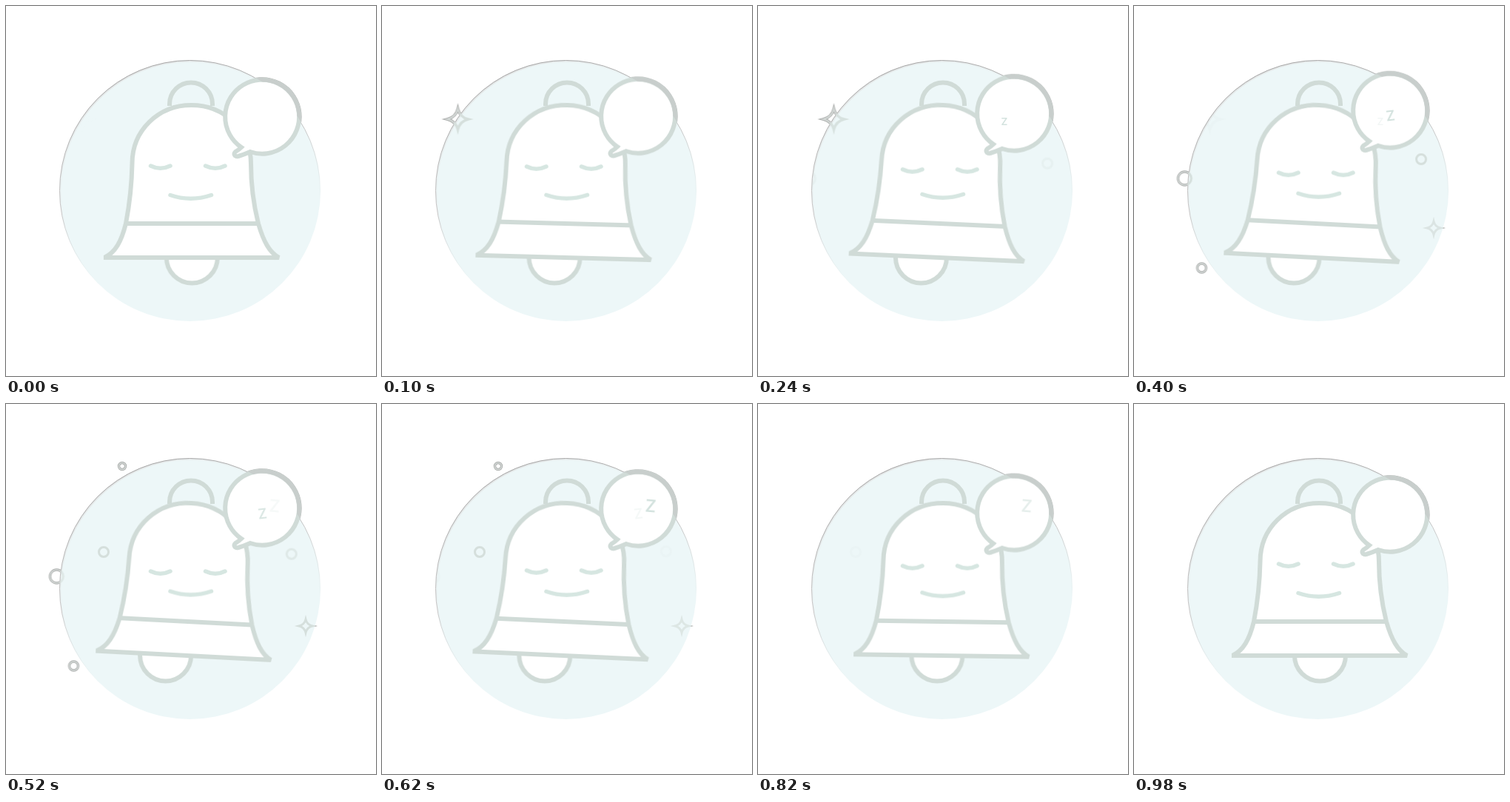
An HTML page that plays this animation: 500x500 px, repeating every 1 s.

```html
<!DOCTYPE html>
<html lang="en">
<head>
<meta charset="utf-8">
<title>Sleeping bell</title>
<style>
html, body { margin: 0; width: 100%; height: 100%; overflow: hidden; background: #fff; }
svg { display: block; width: 100vw; height: 100vh; }
.line { fill: none; stroke: #d0dbd7; stroke-width: 6; }
.solid { fill: #fff; }
.face { fill: none; stroke: #d6e6e1; stroke-width: 5.5; stroke-linecap: round; }
.spark { fill: none; stroke-miterlimit: 8; }
#bell { transform-origin: 250px 131px; }
text { font-family: Inter, "Open Sans", sans-serif; font-weight: 600; fill: #d3e2de; text-anchor: middle; }
</style>
</head>
<body>
<svg viewBox="0 0 500 500">
  <defs>
    <clipPath id="in"><circle cx="248.5" cy="249.5" r="176.5"/></clipPath>
    <clipPath id="out"><path clip-rule="evenodd" d="M0 0H500V500H0ZM72 249.5a176.5 176.5 0 1 0 353 0a176.5 176.5 0 1 0 -353 0Z"/></clipPath>
    <linearGradient id="rim" x1=".25" y1="0" x2=".6" y2="1">
      <stop offset="0" stop-color="#a3a1a1"/>
      <stop offset=".45" stop-color="#c8c5c5"/>
      <stop offset=".75" stop-color="#e4eeee" stop-opacity="0"/>
    </linearGradient>
    <linearGradient id="glow" x1=".2" y1="0" x2=".7" y2=".8">
      <stop offset="0" stop-color="#e0e1e1"/>
      <stop offset=".6" stop-color="#edf7f8" stop-opacity="0"/>
    </linearGradient>
    <path id="balloon" d="M330 197A50 50 0 1 0 318 191Q315 194 310 197C307 200 309 204 314 203Q321 201 330 197Z"/>
  </defs>
  <circle cx="248.5" cy="249.5" r="176.5" fill="#edf7f8"/>
  <circle cx="248.5" cy="249.5" r="175" fill="none" stroke="url(#glow)" stroke-width="2.5"/>
  <circle cx="248.5" cy="249.5" r="176" fill="none" stroke="url(#rim)"/>
  <g id="inner" clip-path="url(#in)"></g>
  <g id="outer" clip-path="url(#out)"></g>

  <path class="line" d="M221 135V132.500A29 29 0 0 1 279 132.500V135"/>
  <circle id="clapper" class="line solid" cx="251.500" cy="340" r="34.500"/>
  <g id="bell">
    <path class="line solid" d="M132 340H369C356 333 348 318 341 294C334 266 331 238 331 213C331 168 295 134 250.500 134C206 134 170.500 168 170.500 213C170 240 167 268 162 294C156 318 148 333 133 340"/>
    <path class="line" d="M162 294H341"/>
  </g>
  <path id="eyes" class="face" d="M195.500 216Q208.500 222.500 222 216M269.500 216Q283 222.500 296 216"/>
  <path id="mouth" class="face" d="M222 255.500Q249.500 265 277.500 255.500"/>

  <g clip-path="url(#out)"><use class="float" href="#balloon" fill="none" stroke="#b4b6b5" stroke-width="7"/></g>
  <use class="float line solid" href="#balloon" style="fill:#fff"/>
  <g clip-path="url(#out)"><use class="float" href="#balloon" fill="none" stroke="#c8cecc" stroke-width="5.500"/></g>
  <g id="zs"></g>
</svg>
<script>
const LOOP = 1000;
const NS = 'http://www.w3.org/2000/svg';
const $ = id => document.getElementById(id);

function add(parent, tag, attrs) {
  const el = document.createElementNS(NS, tag);
  for (const k in attrs) el.setAttribute(k, attrs[k]);
  return parent.appendChild(el);
}
function play(el, frames) {
  el.animate(frames, { duration: LOOP, iterations: Infinity }).startTime = 0;
}
// there and back again, turning at half time
function sway(el, from, to, easeOut = 'ease-in-out') {
  play(el, [
    { transform: from, easing: easeOut },
    { transform: to, offset: 0.5, easing: 'ease-in-out' },
    { transform: from }
  ]);
}
// steps are [ms, opacity]
function fade(el, steps) {
  const all = [[0, 0], ...steps, [LOOP, 0]];
  play(el, all.map(([t, opacity]) => ({ offset: t / LOOP, opacity })));
}

const swing = 'cubic-bezier(.215,.61,.355,1)';
sway($('bell'), 'rotate(0deg)', 'rotate(3deg)', swing);
sway($('clapper'), 'translateX(0px)', 'translateX(-36px)', swing);
sway($('eyes'), 'translateY(0px)', 'translateY(10px)');
sway($('mouth'), 'translateY(0px)', 'translateY(-2.5px)');
document.querySelectorAll('.float').forEach(el =>
  sway(el, 'translateY(0px)', 'translateY(-9px)'));

const star = s => {
  const a = 15 * s, b = 3 * s;
  return `M0 ${-a}Q${b} ${-b} ${a} 0Q${b} ${b} 0 ${a}Q${-b} ${b} ${-a} 0Q${-b} ${-b} 0 ${-a}Z`;
};
const ring = r => `M${-r} 0a${r} ${r} 0 1 0 ${2 * r} 0a${r} ${r} 0 1 0 ${-2 * r} 0Z`;

const sparks = [
  { x: 102.5, y: 153, d: star(0.93), w: 3.5, start: 0 },
  { x: 405, y: 300, d: star(0.6), w: 3, start: 340 },
  { x: 68.5, y: 233, d: ring(9), w: 3, start: 220 },
  { x: 91.5, y: 354, d: ring(6), w: 3, start: 220 },
  { x: 391.5, y: 213.5, d: ring(6.5), w: 3, start: 220, drift: [-8, -15] },
  { x: 157, y: 84, d: ring(4.5), w: 3, start: 420 },
  { x: 132, y: 200, d: ring(6.5), w: 3, start: 420 }
];

for (const { x, y, d, w, start, drift } of sparks) {
  const end = start + 420;
  const spot = { class: 'spark', transform: `translate(${x} ${y})` };
  const soft = add(add($('inner'), 'g', spot), 'path', { d, stroke: '#d5dfdc', 'stroke-width': w });
  fade(soft, [[start, 0], [start + 80, 1], [end - 200, 1], [end, 0]]);
  if (drift) {
    play(soft.parentNode, [
      { transform: `translate(${x}px,${y}px)` },
      { transform: `translate(${x}px,${y}px)`, offset: start / LOOP },
      { transform: `translate(${x + drift[0]}px,${y + drift[1]}px)`, offset: end / LOOP },
      { transform: `translate(${x + drift[0]}px,${y + drift[1]}px)` }
    ]);
  }
  // beyond the disc the parts switch on and off hard, with a darker edge
  const hard = add($('outer'), 'g', spot);
  add(hard, 'path', { d, stroke: '#aeb0af', 'stroke-width': w + 0.4 });
  add(hard, 'path', { d, stroke: '#d3d8d6', 'stroke-width': w - 1.4 });
  const on = start + 40, off = end - 100;
  fade(hard, [[on, 0], [on, 1], [off, 1], [off, 0]]);
}

const letters = [
  { x: 333, y: 156, size: 13.5, turn: 0, steps: [[120, 0], [220, 1], [300, 1], [440, 0]] },
  { x: 346.5, y: 148, size: 18.5, turn: -7, steps: [[280, 0], [380, 1], [500, 1], [660, 0]] },
  { x: 363, y: 138, size: 22.5, turn: 5, steps: [[500, 0], [600, 1], [740, 1], [940, 0]] }
];
for (const { x, y, size, turn, steps } of letters) {
  const z = add($('zs'), 'text', {
    y: size * 0.364, 'font-size': size, transform: `translate(${x} ${y}) rotate(${turn})`
  });
  z.textContent = 'Z';
  fade(z, steps);
}
</script>
</body>
</html>
```
